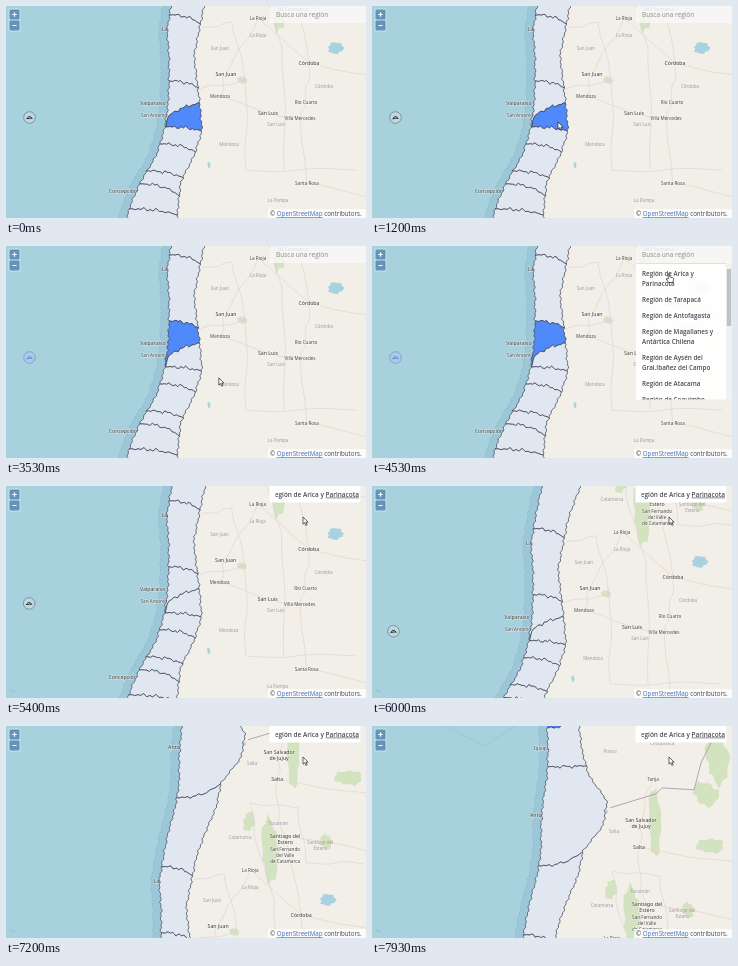
These frames come from a looping animation (360 px wide and 212 px high, 8000 ms). An HTML page:

```html
<!DOCTYPE html>
<html lang="es">
<head>
<meta charset="utf-8">
<title>Mapa de regiones</title>
<style>
html, body { margin: 0; width: 100%; height: 100%; overflow: hidden; background: #a7d1dc; }
svg { display: block; width: 100vw; height: 100vh; }
path { fill: none; stroke-linejoin: round; }
text { font-family: "Open Sans", sans-serif; font-size: 6.2px; fill: #444; }
#hint { font-size: 6.5px; fill: #8b8b8b; }
#list text, #chosen text { font-weight: 600; font-size: 6.3px; fill: #4a4a55; }
#chosen text { font-size: 6.45px; }
#labels text { font-family: "Noto Sans", sans-serif; paint-order: stroke; stroke: #fff; stroke-opacity: .6; stroke-width: .9; }
#labels .city { font-size: 5.2px; fill: #333; }
#labels .town { font-size: 4.6px; }
#labels .area { font-size: 4.5px; fill: #a49aa6; stroke: none; }
#cursor path { fill: #fff; stroke: #222; stroke-width: .7; }
</style>
</head>
<body>
<svg viewBox="0 0 360 212">
  <defs>
    <clipPath id="field"><rect x="269.5" width="84" height="17"/></clipPath>
    <clipPath id="listBox"><rect x="264" y="17" width="96" height="136.5"/></clipPath>
  </defs>
  <rect width="360" height="212" fill="#a7d1dc"/>
  <g id="map"><g id="base"></g><g id="labels"></g><g id="regions"></g></g>

  <rect x="2.5" y="2.5" width="12" height="23" rx="1.5" fill="#fff" fill-opacity=".4"/>
  <rect x="3.5" y="3.5" width="10" height="10" rx="1" fill="#6592bb"/>
  <rect x="3.5" y="14.5" width="10" height="10" rx="1" fill="#6592bb"/>
  <path d="M6.3 8.5h4.400M8.500 6.300v4.400M6.500 19.500h4" stroke="#fff" stroke-width="1.1"/>

  <rect x="262" y="203" width="98" height="9" fill="#fff" fill-opacity=".8"/>
  <text x="264" y="210.2">© <tspan fill="#3c6fc4" text-decoration="underline">OpenStreetMap</tspan> contributors.</text>

  <g id="search">
    <rect x="264" width="96" height="17" fill="#f8f8f8" fill-opacity=".85"/>
    <text id="hint" x="270" y="10.6">Busca una región</text>
  </g>
  <g id="list" clip-path="url(#listBox)">
    <rect x="264" y="17" width="96" height="137" fill="#fff" fill-opacity=".93"/>
    <path d="M264 17h96" stroke="#a9cbe0"/>
    <rect x="354" y="17" width="6" height="137" fill="#f1f1f1"/>
    <rect x="354.8" y="23" width="4.4" height="57" fill="#c1c1c1"/>
  </g>
  <g id="chosen">
    <rect x="263.5" width="90.8" height="16.5" fill="#fff"/>
    <text x="353" y="10.6" text-anchor="end" clip-path="url(#field)">Región de Arica y <tspan text-decoration="underline">Parinacota</tspan></text>
    <path d="M5 203v2.500h4.500" stroke="#8dbccb" stroke-width=".7"/>
  </g>
  <g id="cursor">
    <path id="arrow" d="M0 0v7.200l1.700-1.500 1.200 2.600 1.200-.5-1.200-2.600h2.200z"/>
    <path id="hand" d="M-.8 0q.8-1 1.500 0v3l3 .7q1 .4.800 1.800l-.7 3h-4.300l-2.300-3.500q.4-1 2 0z"/>
  </g>
</svg>
<script>
const LOOP = 8000, FRAME = 1000 / 15;
const NORTH = -225, SOUTH = 225;
const $ = id => document.getElementById(id);

function add(parent, tag, attrs, text) {
  const node = document.createElementNS('http://www.w3.org/2000/svg', tag);
  for (const key in attrs) node.setAttribute(key, attrs[key]);
  if (text) node.textContent = text;
  return $(parent).appendChild(node);
}
const range = (a, b, n) => Array.from({ length: n + 1 }, (_, i) => a + (b - a) * i / n);
const outline = points => 'M' + points.map(p => p.map(v => v.toFixed(1))).join('L');
const ripple = v => .6 * Math.sin(v * 1.1) + .5 * Math.sin(v * .47 + 2);
const stroke = (points, color, width) => add('base', 'path', { d: outline(points), stroke: color, 'stroke-width': width });

// Edge of the country as x by latitude, from evenly spaced knots
const profile = (...knots) => y => {
  const pos = (y - NORTH) / (SOUTH - NORTH) * (knots.length - 1);
  const i = Math.max(0, Math.min(knots.length - 2, Math.floor(pos)));
  return knots[i] + (knots[i + 1] - knots[i]) * (pos - i) + ripple(y);
};
const coast = profile(187, 187, 188, 187, 183, 181, 181, 177, 170, 165, 161, 163, 163, 162, 158, 150, 135, 124, 118);
const andes = profile(215, 219, 222, 229, 247, 243, 223, 218, 207, 198, 193, 188, 191, 194, 196, 188, 175, 172, 171);
const along = (edge, a, b) => range(a, b, Math.ceil(Math.abs(b - a) / 1.5)).map(y => [edge(y), y]);

// Region border: latitude on the coast, latitude in the Andes, bend
function border([west, east, bend = 2.5]) {
  const x0 = coast(west), x1 = andes(east);
  return range(0, 1, 16).map(p => {
    const x = x0 + (x1 - x0) * p;
    return [x, west + (east - west) * p ** bend + 2 * Math.sin(p * Math.PI) * ripple(x + west)];
  });
}

// Base map
const shore = along(coast, NORTH, SOUTH);
add('base', 'path', { d: outline([...shore, [420, SOUTH], [420, NORTH]]) + 'Z', style: 'fill:#f2eee8' });
for (const [shift, color, width] of [[-4, '#9bc7d8', 6], [-8, '#8fb2cb', .7]])
  stroke(shore.map(([x, y]) => [x + shift, y]), color, width);

function blob(x, y, rx, ry, fill) {
  const points = range(0, 2 * Math.PI, 18).slice(1).map((a, i) => {
    const r = 1 + .3 * ripple(i * 5 + x);
    return [x + rx * r * Math.cos(a), y + ry * r * Math.sin(a)];
  });
  add('base', 'path', { d: outline(points) + 'Z', style: 'fill:' + fill });
}
const woods = [[272, -8, 9, 29], [295, -104, 7, 30], [251, -36, 6, 9], [328, -16, 5, 8],
  [350, -80, 12, 8], [346, -132, 13, 11], [357, -168, 11, 25], [236, 74, 4, 4]];
woods.forEach(w => blob(...w, '#d3e2bf'));
blob(330, 42, 9, 5, '#a9d2e0');
blob(203, 159, 1.5, 3, '#a9d2e0');

// Labels: "x,y name", slashes break lines
const places = {};
function label(cls, entries, anchor = 'middle') {
  entries.split('|').forEach(entry => {
    const [, x, y, name] = entry.match(/^(\S+),(\S+) (.+)$/);
    places[name] ??= [+x, +y];
    name.split('/').forEach((row, i) =>
      add('labels', 'text', { x, y: +y + 1.8 + i * 6, class: cls, 'text-anchor': anchor }, row));
  });
}
label('city', '220,68 San Juan|303,57 Córdoba|262,107 San Luis|287,-22 Santiago del/Estero|281,-106 San Salvador/de Jujuy|279,-79 Salta|147,97 Valparaíso|117,185 Concepción');
label('town', '252,12 La Rioja|214,90 Mendoza|300,96 Río Cuarto|294,112 Villa Mercedes|148,109 San Antonio|301,177 Santa Rosa|287,-9 San Fernando/del Valle/de Catamarca|293,-147 Tarija');
label('area', '214,42 San Juan|252,29 La Rioja|318,80 Córdoba|270,118 San Luis|223,138 Mendoza|272,194 La Pampa|242,-21 Catamarca|280,-35 Tucumán|322,-16 Santiago del/Estero|250,-175 Potosí|243,-115 Jujuy|254,-95 Salta|302,-183 Chuquisaca');
label('city', '156,23 La Serena|170,-111 Antofagasta', 'start');
label('town', '174,-178 Iquique', 'start');

// Roads join places, with a gentle wobble
const wobble = ([ax, ay], [bx, by]) => range(0, 1, 8).map(p => {
  const sway = 2.5 * Math.sin(p * Math.PI) * ripple(ax + p * 6);
  return [ax + (bx - ax) * p + sway, ay + (by - ay) * p + sway];
});
const roads = ['San Juan|Mendoza|San Luis|Villa Mercedes|Río Cuarto|Córdoba|La Rioja|San Juan',
  'Córdoba|Santiago del/Estero|Tucumán|Salta|San Salvador/de Jujuy|Tarija', 'Villa Mercedes|Santa Rosa'];
roads.forEach(road => road.split('|').map(name => places[name]).forEach((to, i, stops) =>
  i && stroke(wobble(stops[i - 1], to), '#e9d8c6', .8)));
['Córdoba', 'Santa Rosa', 'Salta', 'Santiago del/Estero'].forEach(name =>
  stroke(wobble(places[name], [400, places[name][1] + 20]), '#e9d8c6', .8));

// Province limits and national borders
const limits = [[[192, 84], [239, 74], [240, 164], [350, 164]], [[239, 74], [226, 16], [196, 22]],
  [[278, 164], [276, 42], [260, -8], [252, -55], [300, -50], [308, 5], [365, 6]]];
limits.forEach(points => points.forEach((p, i) => i && stroke(wobble(points[i - 1], p), '#dbd1dc', .6)));
stroke([[250, -118], [296, -132], [302, -138], [334, -136], [341, -163], [352, -185], [352, NORTH]], '#ab9bb2', .9);
stroke([[86, -200], [124, -180], [156, -200]], '#97bfce', .6);

// Regions are the bands between neighbouring borders
const borders = [[NORTH, NORTH], [-198, -212], [-159, -160], [-60, -74], [9, 18], [75, 82], [121, 97, .35],
  [121, 125], [138, 146], [165, 172], [178, 190], [203, 209], [SOUTH, SOUTH]];
const regions = borders.slice(1).map((low, i) => {
  const high = borders[i];
  const ring = [...border(high), ...along(andes, high[1], low[1]), ...border(low).reverse(), ...along(coast, low[0], high[0])];
  return add('regions', 'path', { d: outline(ring) + 'Z', stroke: '#3b4256', 'stroke-width': .75 });
});
const ARICA = 0, VALPARAISO = 5, METRO = 6;

add('regions', 'circle', { cx: 2, cy: -50, r: 4, fill: 'none', stroke: '#8aa6c2', 'stroke-width': .8 });
const ring = add('regions', 'circle', { cx: 23.5, cy: 111.5, r: 5.8, 'stroke-width': .8 });
const isle = add('regions', 'path', { d: 'M20.800 112.800l1.800-2.200 2 .2 1.600 1.700-2-.3z', 'stroke-width': .9 });

// Search results
let rowY = 14.2;
const results = ['Región de Arica y/Parinacota', 'Región de Tarapacá', 'Región de Antofagasta', 'Región de Magallanes y/Antártica Chilena',
  'Región de Aysén del/Gral.Ibañez del Campo', 'Región de Atacama', 'Región de Coquimbo'];
results.forEach(name => name.split('/').forEach((row, i) =>
  add('list', 'text', { x: 270, y: rowY += i ? 10 : 16 }, row)));

// Motion: cursor stops as time, x, y
const track = [[1200, 186, 116], [2330, 176, 79], [2670, 176, 79], [3500, 211, 134], [3930, 318, 7],
  [4130, 318, 7], [4470, 297, 28], [4900, 297, 28], [5050, 297, 31], [LOOP, 297, 31]];
const PAN = { start: 5000, length: 4800, dx: -18, dy: 301 };
const smooth = p => p * p * (3 - 2 * p);
const show = (node, on) => node.setAttribute('visibility', on ? 'inherit' : 'hidden');

function pointer(t) {
  const i = track.findIndex(stop => stop[0] > t);
  if (i < 1) return track[0].slice(1);
  const [t0, x0, y0] = track[i - 1], [t1, x1, y1] = track[i];
  const p = smooth((t - t0) / (t1 - t0));
  return [x0 + (x1 - x0) * p, y0 + (y1 - y0) * p];
}

function draw(t) {
  const pan = smooth(Math.max(0, (t - PAN.start) / PAN.length));
  $('map').setAttribute('transform', `translate(${PAN.dx * pan} ${PAN.dy * pan})`);

  const picked = t >= 4870, open = t >= 4060 && !picked, hand = open && t > 4330;
  const active = picked ? ARICA : t >= 2050 ? VALPARAISO : METRO;
  regions.forEach((region, i) => { region.style.fill = i === active ? '#5089fb' : '#e0e7f1'; });
  const lit = active === VALPARAISO;
  ring.setAttribute('stroke', lit ? '#7d96cf' : '#71838f');
  ring.setAttribute('fill', lit ? '#a9cbe3' : '#bdd8e1');
  isle.setAttribute('stroke', lit ? '#5b84e0' : '#1d2429');

  show($('list'), open);
  show($('search'), !picked);
  show($('chosen'), picked);
  show($('cursor'), t >= 1200);
  show($('hand'), hand);
  show($('arrow'), !hand);
  $('cursor').setAttribute('transform', `translate(${pointer(t)})`);
}

const begin = performance.now();
function tick() {
  const t = (performance.now() - begin) % LOOP;
  draw(Math.floor((t + 4) / FRAME) * FRAME);
  requestAnimationFrame(tick);
}
tick();
</script>
</body>
</html>
```
